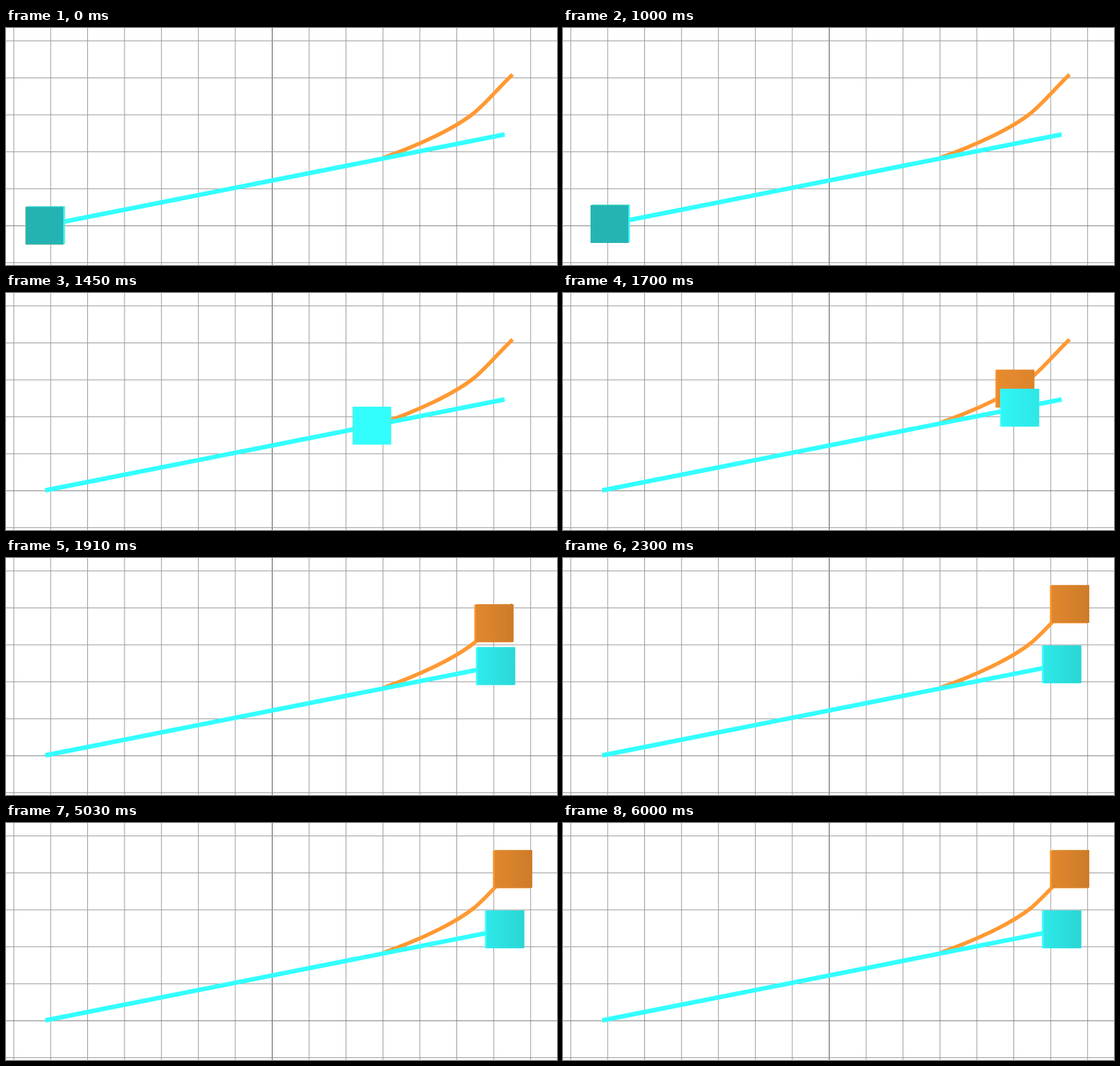
Animation of 800 by 344 pixels, one loop 6.03 s. Source, as an HTML page:

```html
<!DOCTYPE html>
<html>
<head>
<meta charset="utf-8">
<style>
html, body { margin: 0; width: 100%; height: 100%; overflow: hidden; background: #fff; }
svg { display: block; width: 100vw; height: 100vh; }
</style>
</head>
<body>
<svg id="stage" viewBox="0 0 800 344">
  <defs>
    <linearGradient id="shade">
      <stop offset="0" stop-opacity="0"/>
      <stop offset="1" stop-opacity=".085"/>
    </linearGradient>
  </defs>
  <g id="grid"></g>
  <path id="curve" d="M547 188.5C595 172 650 147 680 123C702 104 712 90 735.5 67.5" fill="none" stroke="#ff9933" stroke-width="5.5"/>
  <path d="M57 286.5L724 154.5" stroke="#33ffff" stroke-width="6.5"/>
</svg>
<script>
const LOOP = 6030;
const START = [57, 286.5], END = [724, 154.3];
const FIRST = { at: 965, dur: 1155 };
const TURN = { at: 1462, dur: 765 };
const stage = document.getElementById('stage');
const grid = document.getElementById('grid');
const curve = document.getElementById('curve');
const curveLen = curve.getTotalLength();

function add(parent, tag, attrs) {
  const el = document.createElementNS('http://www.w3.org/2000/svg', tag);
  for (const key in attrs) el.setAttribute(key, attrs[key]);
  return parent.appendChild(el);
}

const clamp = v => Math.min(1, Math.max(0, v));
const mix = (a, b, k) => a + (b - a) * k;

// cubic-bezier(.25, .1, .25, 1)
function ease(x) {
  if (x <= 0 || x >= 1) return clamp(x);
  const bez = (a, b, s) => 3 * a * s * (1 - s) ** 2 + 3 * b * s * s * (1 - s) + s ** 3;
  let lo = 0, hi = 1;
  for (let i = 0; i < 24; i++) {
    const mid = (lo + hi) / 2;
    if (bez(.25, .25, mid) < x) lo = mid; else hi = mid;
  }
  return bez(.1, 1, lo);
}

// Piecewise linear light level by horizontal position
function level(stops, x) {
  let [px, pv] = stops[0];
  for (const [sx, sv] of stops) {
    if (x <= sx) return sx === px ? sv : mix(pv, sv, (x - px) / (sx - px));
    [px, pv] = [sx, sv];
  }
  return pv;
}

function makeGrid() {
  for (let i = -7; i <= 7; i++)
    add(grid, 'path', { d: `M${386.5 + i * 53.6} 0V344`, stroke: i ? '#999' : '#555' });
  for (let i = -5; i <= 1; i++)
    add(grid, 'path', { d: `M0 ${287 + i * 53.65}H800`, stroke: i ? '#999' : '#777' });
}

function makeCube(rgb, light) {
  const g = add(stage, 'g', {});
  const face = { x: -27.4, y: -27.4, width: 54.8, height: 54.8 };
  const side = add(g, 'rect', { ...face, fill: `rgb(${rgb})` });
  const front = add(g, 'rect', face);
  const tint = add(g, 'rect', { ...face, fill: 'url(#shade)' });
  return ([x, y]) => {
    const dx = (x - 386) * .0035, dy = (y - 172) * .0035;
    const k = level(light, x);
    g.setAttribute('transform', `translate(${x} ${y})`);
    side.setAttribute('transform', `translate(${-dx} ${-dy})`);
    for (const el of [front, tint]) el.setAttribute('transform', `translate(${dx} ${dy})`);
    front.setAttribute('fill', `rgb(${rgb.map(c => Math.round(c * k))})`);
    tint.setAttribute('opacity', clamp((x - 600) / 90));
  };
}

makeGrid();
const orange = makeCube([255, 153, 51], [[547, 1], [690, .88], [736, .88]]);
const cyan = makeCube([51, 255, 255], [[57, .7], [229, .76], [537, 1], [612, 1], [713, .92], [724, .91]]);

function straight(t) {
  const k = ease((t - FIRST.at) / FIRST.dur);
  return [mix(START[0], END[0], k), mix(START[1], END[1], k)];
}

function turned(t) {
  if (t < TURN.at) return straight(t);
  const left = 1 - clamp((t - TURN.at) / TURN.dur);
  const p = curve.getPointAtLength(curveLen * (1 - left * left));
  return [p.x, p.y - .5];
}

function draw(t) {
  orange(turned(t));
  cyan(straight(t));
}

const begin = performance.now();
function tick() {
  draw((performance.now() - begin) % LOOP);
  requestAnimationFrame(tick);
}
draw(0);
requestAnimationFrame(tick);
</script>
</body>
</html>
```
